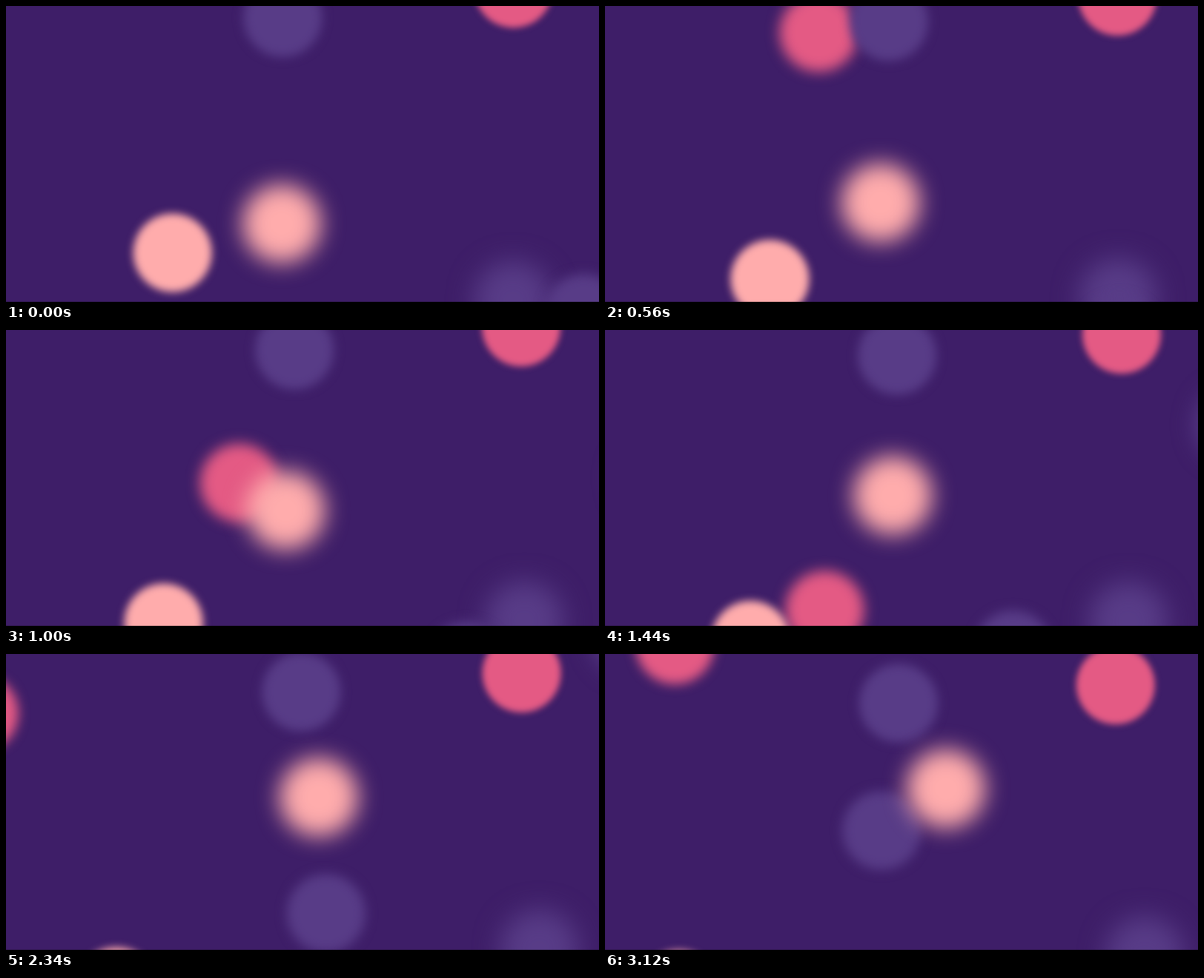
These frames come from a looping animation (800x400 px, 3220 ms). An HTML page:

```html
<!DOCTYPE html>
<html lang="en">
<head>
<meta charset="utf-8">
<title>Drifting lights</title>
<style>
  html, body { margin: 0; width: 100%; height: 100%; overflow: hidden; background: #3e1e68; }
  #stage { position: relative; width: 800px; height: 400px; overflow: hidden; }
  #stage::after { content: ""; position: absolute; inset: 399px 0 0; background: rgba(0, 0, 0, .2); }
  i { position: absolute; left: -53px; top: -53px; width: 106px; height: 106px; border-radius: 50%; }
</style>
</head>
<body>
<div id="stage"></div>
<script>
const LOOP = 3220, STEPS = 29, LEAD = 12;
const violet = '#583c87', rose = '#e45a84', peach = '#ffacac';

// Each light circles a pivot: colour, blur, pivot x, pivot y, radius, start angle, degrees per step
const lights = [
  [rose, 9, -352, 222, 667, -34.8, 3.72],
  [rose, 7.5, 247.8, 344.2, 388, -208.5, 3.4],
  [violet, 17, 701, 425, 32, -122, 3.2],
  [violet, 7.5, 646, 167, 282, 61.7, 3.7],
  [violet, 15, 1203.6, 36, 366, 126.5, 3],
  [violet, 7, 358.7, 52.6, 39.7, -68.3, 3.165],
  [rose, 4, 640.7, 12.1, 56.6, -39.1, 2.535],
  [peach, 5.5, 114.2, 344.3, 111, -5.6, 3.68],
  [peach, 15, 468.2, 279.1, 97.4, -188.9, 3.357]
].map(([colour, blur, x, y, radius, start, turn]) => {
  const dot = document.createElement('i');
  dot.style.background = colour;
  dot.style.filter = `blur(${blur}px)`;
  document.getElementById('stage').append(dot);
  return step => {
    const a = (start + turn * step) * Math.PI / 180;
    dot.style.transform = `translate(${x + radius * Math.cos(a)}px, ${y + radius * Math.sin(a)}px)`;
  };
});

// The picture advances nine times a second
function draw() {
  const t = performance.now() % LOOP;
  const step = Math.min(STEPS - 1, Math.floor((t + LEAD) * 9 / 1000));
  lights.forEach(place => place(step));
  requestAnimationFrame(draw);
}
draw();
</script>
</body>
</html>
```
